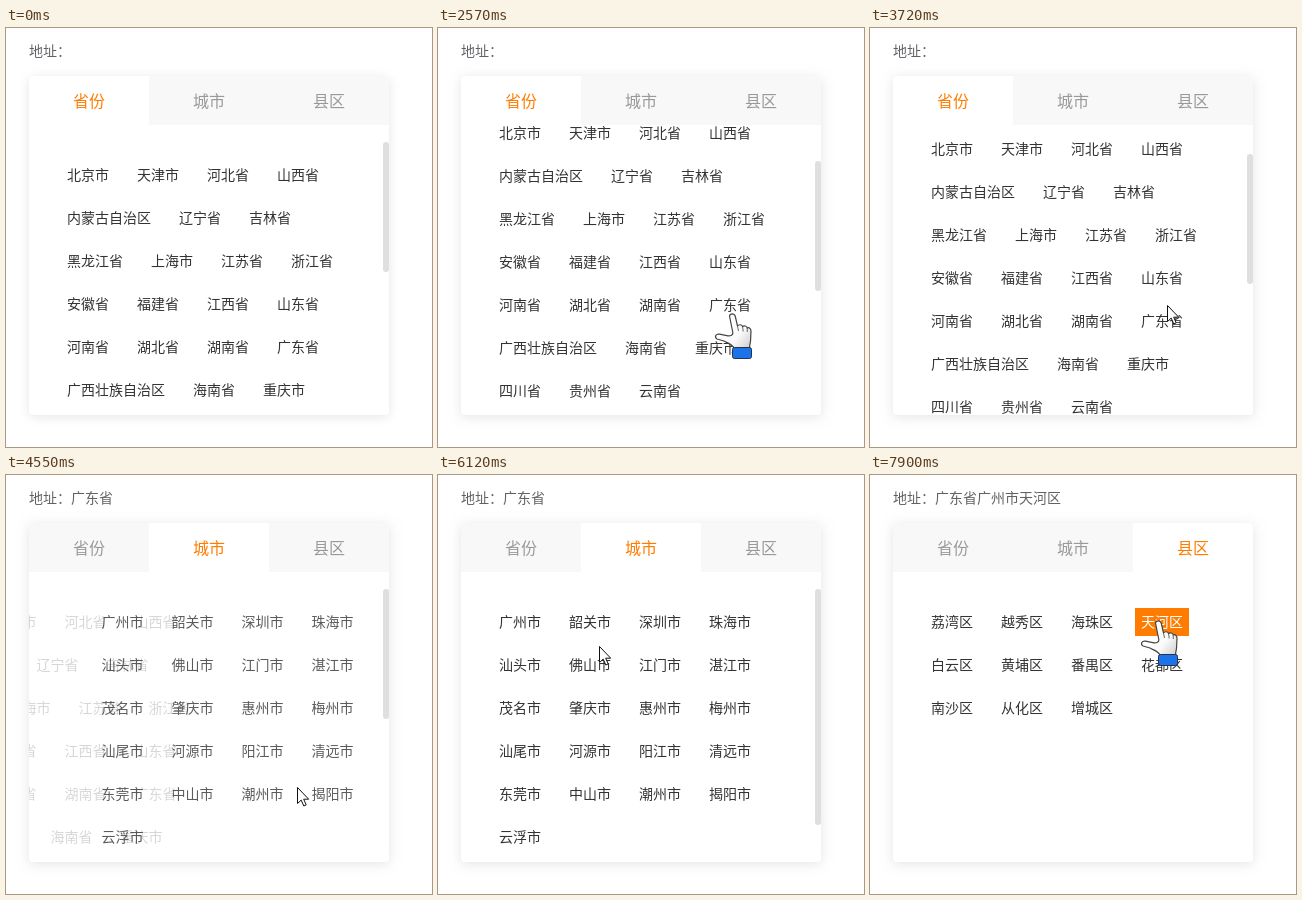
An HTML page with a canvas for the animation above (8 s loop, 426x419 px).

```html
<!DOCTYPE html>
<html lang="zh-CN">
<head>
<meta charset="utf-8">
<title>地址选择</title>
<style>
html, body { margin: 0; width: 100%; height: 100%; overflow: hidden; background: #fff; }
canvas { display: block; width: 426px; height: 419px; }
</style>
</head>
<body>
<canvas id="stage" lang="zh-CN"></canvas>
<script>
const W = 426, H = 419, LOOP = 8000;
const FONT = '"Noto Sans CJK SC", "Noto Sans CJK", "Noto Sans", sans-serif';
const ORANGE = '#ff7c00';
const CARD = { x: 23, y: 48, w: 360, h: 339 };
const TAB_W = 120, TAB_H = 49;

const canvas = document.getElementById('stage');
const ctx = canvas.getContext('2d', { alpha: false });
const dpr = window.devicePixelRatio || 1;
canvas.width = W * dpr;
canvas.height = H * dpr;

// Flow names into wrapped rows, 14px per character
function flow(text) {
  let x = 61, y = 147;
  return text.split(' ').map(name => {
    const w = name.length * 14;
    if (x + w > 335) { x = 61; y += 43; }
    const item = { name, x, y, w };
    x += w + 28;
    return item;
  });
}

const provinces = flow('北京市 天津市 河北省 山西省 内蒙古自治区 辽宁省 吉林省 黑龙江省 上海市 江苏省 浙江省 ' +
  '安徽省 福建省 江西省 山东省 河南省 湖北省 湖南省 广东省 广西壮族自治区 海南省 重庆市 四川省 贵州省 云南省 ' +
  '西藏自治区 陕西省 甘肃省 青海省 宁夏回族自治区 新疆维吾尔自治区 台湾省 香港特别行政区 澳门特别行政区');
const cities = flow('广州市 韶关市 深圳市 珠海市 汕头市 佛山市 江门市 湛江市 茂名市 肇庆市 惠州市 梅州市 ' +
  '汕尾市 河源市 阳江市 清远市 东莞市 中山市 潮州市 揭阳市 云浮市');
const districts = flow('荔湾区 越秀区 海珠区 天河区 白云区 黄埔区 番禺区 花都区 南沙区 从化区 增城区');
const lists = [provinces, cities, districts];
const tabs = ['省份', '城市', '县区'];

// Press, release and chosen name for each level
const picks = [
  { down: 4170, up: 4300, name: '广东省' },
  { down: 6630, up: 6760, name: '广州市' },
  { down: 7770, up: 7900, name: '天河区' }
];
const SLIDE = 500, SHIFT = 177;

// Pointer path: time, x, y
const path = [
  [0, 430, -40], [400, 430, -40], [450, 398, -19], [505, 335, -14], [560, 260, -19],
  [840, 195, -21], [1300, 142, 148], [1580, 164, 204], [1640, 197, 218], [1700, 208, 214],
  [2220, 294, 286], [3600, 294, 286], [3720, 297, 277], [4030, 291, 312], [4550, 291, 312],
  [4950, 284, 199], [5350, 233, 146], [5750, 275, 192], [5880, 293, 219], [6120, 161, 171],
  [6480, 85, 133], [6590, 88, 141], [6770, 88, 141], [7380, 303, 156], [7460, 303, 156],
  [7520, 288, 146], [8000, 288, 146]
];

const clamp = v => Math.max(0, Math.min(1, v));
const sineEase = u => (1 - Math.cos(Math.PI * clamp(u))) / 2;

// CSS "ease": cubic-bezier(.25, .1, .25, 1)
function ease(u) {
  if (u <= 0) return 0;
  if (u >= 1) return 1;
  const bez = (s, a, b) => 3 * (1 - s) * (1 - s) * s * a + 3 * (1 - s) * s * s * b + s * s * s;
  let lo = 0, hi = 1;
  for (let i = 0; i < 24; i++) {
    const mid = (lo + hi) / 2;
    if (bez(mid, 0.25, 0.25) < u) lo = mid; else hi = mid;
  }
  return bez(lo, 0.1, 1);
}

const slope = (i, k) => (path[i + 1][k] - path[i][k]) / (path[i + 1][0] - path[i][0]);

function tangent(i, k) {
  if (i === 0 || i === path.length - 1) return 0;
  const a = slope(i - 1, k), b = slope(i, k);
  return a * b <= 0 ? 0 : 2 * a * b / (a + b);
}

// Monotone cubic through the path points
function pointer(t) {
  let i = 0;
  while (i < path.length - 2 && path[i + 1][0] <= t) i++;
  const h = path[i + 1][0] - path[i][0], u = (t - path[i][0]) / h;
  const axis = k => {
    const a = path[i][k], b = path[i + 1][k];
    const m = tangent(i, k) * h, n = tangent(i + 1, k) * h;
    return a + u * (m + u * (3 * (b - a) - 2 * m - n + u * (2 * (a - b) + m + n)));
  };
  return { x: Math.round(axis(1)), y: Math.round(axis(2)) };
}

function scrollAt(t) {
  return Math.round(200 * (sineEase((t - 2360) / 700) - sineEase((t - 3260) / 604)));
}

function text(str, x, y, size, color) {
  ctx.font = size + 'px ' + FONT;
  ctx.fillStyle = color;
  ctx.fillText(str, x, y);
}

function roundRect(x, y, w, h, r) {
  ctx.beginPath();
  ctx.roundRect(x, y, w, h, r);
  ctx.fill();
}

function drawCard(level) {
  ctx.save();
  ctx.shadowColor = 'rgba(0,0,0,.1)';
  ctx.shadowBlur = 12 * dpr;
  ctx.shadowOffsetY = 2 * dpr;
  ctx.fillStyle = '#fff';
  roundRect(CARD.x, CARD.y, CARD.w, CARD.h, 4);
  ctx.restore();
  tabs.forEach((name, i) => {
    const x = CARD.x + i * TAB_W;
    if (i !== level) {
      ctx.fillStyle = '#f8f8f8';
      roundRect(x, CARD.y, TAB_W, TAB_H, [i === 0 ? 4 : 0, i === 2 ? 4 : 0, 0, 0]);
    }
    text(name, x + 44, 79, 16, i === level ? ORANGE : '#999');
  });
}

function drawList(view, pressed) {
  ctx.globalAlpha = view.alpha;
  for (const it of view.items) {
    const x = it.x + view.dx, y = it.y - view.scroll;
    const on = it.name === pressed;
    if (on) {
      ctx.fillStyle = ORANGE;
      ctx.fillRect(x - 6, y - 14, it.w + 12, 28);
    }
    text(it.name, x, y + 5, 14, on ? '#fff' : '#333');
  }
  ctx.globalAlpha = 1;
}

function overItem(p, view) {
  return p.y > 97 && p.y < 387 && view.items.some(it => {
    const x = it.x + view.dx - 6, y = it.y - view.scroll - 14;
    return p.x >= x && p.x < x + it.w + 12 && p.y >= y && p.y < y + 28;
  });
}

function drawArrow() {
  const pts = [[0, 0], [0, 16], [3.7, 12.6], [6.3, 18.5], [8.7, 17.4], [6.2, 11.7], [11.2, 11.7]];
  ctx.beginPath();
  pts.forEach(([x, y]) => ctx.lineTo(x + 0.5, y + 0.5));
  ctx.closePath();
  ctx.fillStyle = '#fff';
  ctx.strokeStyle = '#111';
  ctx.lineWidth = 1;
  ctx.fill();
  ctx.stroke();
}

function drawHand() {
  const hand = new Path2D('M-2.5 2 C-2-.8 2.5-.8 3.2 2 L5.5 12 C7 10 10 10.5 10.6 12.6 ' +
    'C12 11 15 12 15.2 14 C17 13 19 14.5 19 17 L18.6 26 C18.5 29 17.5 31 17.5 34 L2 34 ' +
    'C0 30-5 29-8 27 L-15 25 C-18 23-16 19.5-12.5 20.2 L-4 21.8 C-1.5 22 1.2 21 .8 18.5 Z');
  const grad = ctx.createLinearGradient(-8, 8, 18, 28);
  grad.addColorStop(0, '#fff');
  grad.addColorStop(0.6, '#fafafa');
  grad.addColorStop(1, '#d8d8d8');
  ctx.fillStyle = grad;
  ctx.strokeStyle = '#444';
  ctx.lineWidth = 1.2;
  ctx.lineJoin = 'round';
  ctx.fill(hand);
  ctx.stroke(hand);
  ctx.lineWidth = 0.8;
  ctx.stroke(new Path2D('M5.5 12 L6.5 17 M10.6 12.6 L11.2 17.5 M15.2 14 L15.3 18'));
  ctx.fillStyle = '#1a73e8';
  ctx.strokeStyle = '#24324a';
  ctx.lineWidth = 1;
  ctx.beginPath();
  ctx.roundRect(0.5, 33.5, 19, 11, 2);
  ctx.fill();
  ctx.stroke();
}

function draw(t) {
  ctx.setTransform(dpr, 0, 0, dpr, 0, 0);
  ctx.fillStyle = '#fff';
  ctx.fillRect(0, 0, W, H);

  const chosen = picks.filter(p => t >= p.up);
  const level = Math.min(2, chosen.length);
  text('地址：' + chosen.map(p => p.name).join(''), 23, 28, 14, '#606266');
  drawCard(level);

  const start = level ? picks[level - 1].up : -SLIDE;
  const p = ease((t - start) / SLIDE);
  const sliding = p < 1;
  const scroll = scrollAt(t);
  const views = [];
  if (sliding) views.push({ items: lists[level - 1], dx: -SHIFT * p, alpha: 1 - p, scroll: 0 });
  views.push({ items: lists[level], dx: SHIFT * (1 - p), alpha: p, scroll });

  const press = picks.find((k, i) => t >= k.down && (t < k.up || i === 2));
  ctx.save();
  ctx.beginPath();
  ctx.rect(CARD.x, CARD.y + TAB_H, CARD.w, CARD.h - TAB_H);
  ctx.clip();
  views.forEach(v => drawList(v, press && press.name));
  ctx.restore();

  // The thumb keeps its old size until the slide is over
  const thumb = [130, 236, 0][sliding ? level - 1 : level];
  if (thumb) {
    ctx.fillStyle = '#dedfe0';
    roundRect(377, 114 + Math.round(scroll * 0.445), 6, thumb, 3);
  }

  const tip = pointer(t);
  ctx.translate(tip.x, tip.y);
  if (views.some(v => overItem(tip, v))) drawHand(); else drawArrow();
}

const begin = performance.now();
function tick() {
  draw((performance.now() - begin) % LOOP);
  requestAnimationFrame(tick);
}
tick();
</script>
</body>
</html>
```
